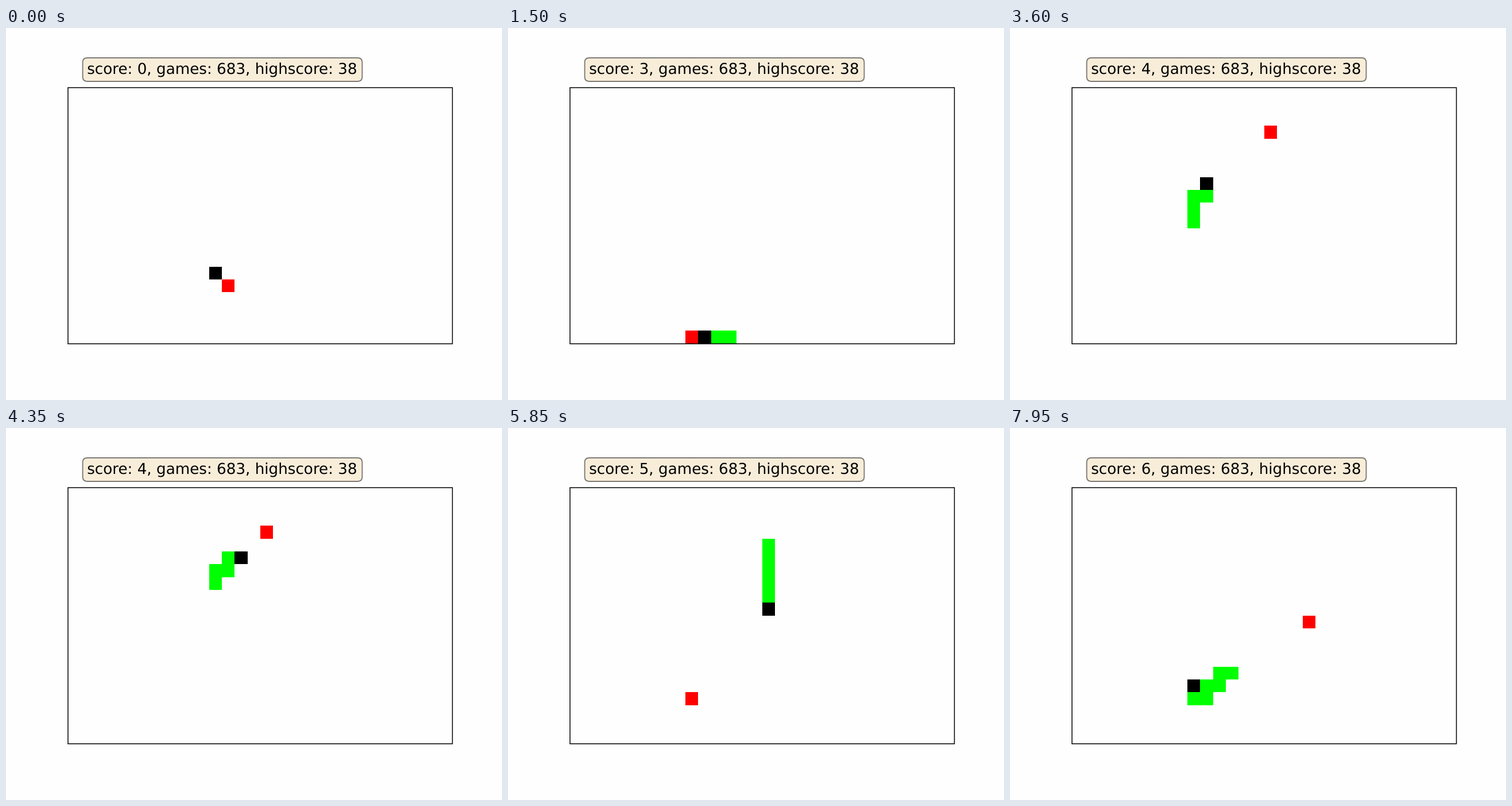
These frames come from a looping animation (864 by 648 pixels, 8000 ms). An HTML page with a canvas:

```html
<!DOCTYPE html>
<html lang="en">
<head>
<meta charset="utf-8">
<title>Snake</title>
<style>
  html, body { margin: 0; width: 100%; height: 100%; overflow: hidden; background: #fefefe; }
  canvas { display: block; }
</style>
</head>
<body>
<canvas id="stage" width="864" height="648"></canvas>
<script>
const ctx = document.getElementById('stage').getContext('2d');
const LOOP = 8000, STEP = 150;

// One letter per step: the direction in which the head moves.
const moves = 'DRDDDRDLLLL' + 'U'.repeat(11) + 'RU'.repeat(5) + 'R' +
  'D'.repeat(8) + 'LD'.repeat(5) + 'LU';
const dirs = { U: [0, -1], D: [0, 1], L: [-1, 0], R: [1, 0] };
const path = [[11, 14]];
for (const m of moves) {
  const [x, y] = path[path.length - 1];
  path.push([x + dirs[m][0], y + dirs[m][1]]);
}

// Food as [first step, column, row], and the steps that score.
const foods = [[0, 12, 15], [2, 13, 18], [6, 10, 19], [10, 9, 19],
  [11, 9, 13], [17, 15, 3], [33, 9, 16], [52, 18, 10]];
const meals = [2, 6, 10, 17, 33, 52];
const scoreAt = step => meals.filter(m => m <= step).length;

const edgeX = c => Math.round(108 + 22.33 * c);
const edgeY = r => Math.round(103.2 + 22.33 * r);

function cell([c, r], color) {
  const x = edgeX(c), y = edgeY(r);
  ctx.fillStyle = color;
  ctx.fillRect(x, y, edgeX(c + 1) - x, edgeY(r + 1) - y);
}

function label(score) {
  const l = 133.6, t = 52, r = 620.5, b = 93, k = 7.9;
  ctx.beginPath();
  ctx.moveTo(l + k, t);
  ctx.lineTo(r - k, t);
  ctx.quadraticCurveTo(r, t, r, t + k);
  ctx.lineTo(r, b - k);
  ctx.quadraticCurveTo(r, b, r - k, b);
  ctx.lineTo(l + k, b);
  ctx.quadraticCurveTo(l, b, l, b - k);
  ctx.lineTo(l, t + k);
  ctx.quadraticCurveTo(l, t, l + k, t);
  ctx.closePath();
  ctx.fillStyle = '#f8edd9';
  ctx.fill();
  ctx.strokeStyle = 'rgba(0, 0, 0, .5)';
  ctx.lineWidth = 1.875;
  ctx.stroke();

  ctx.font = '26.2px "DejaVu Sans", sans-serif';
  ctx.textRendering = 'geometricPrecision';
  ctx.fillStyle = '#000';
  ctx.fillText(`score: ${score}, games: 683, highscore: 38`, 141.2, 79.8);
}

function draw(step) {
  ctx.fillStyle = '#fefefe';
  ctx.fillRect(0, 0, 864, 648);

  cell(foods.filter(f => f[0] <= step).pop().slice(1), '#f00');
  // The body grows one step after a meal.
  const tail = step - scoreAt(step - 1);
  for (let i = tail; i < step; i++) cell(path[i], '#0f0');
  cell(path[step], '#000');

  ctx.strokeStyle = '#000';
  ctx.lineWidth = 1.5;
  ctx.strokeRect(108, 103.9, 669.6, 446.2);
  label(scoreAt(step));
}

const start = performance.now();
function tick() {
  draw(Math.floor((performance.now() - start) % LOOP / STEP));
  requestAnimationFrame(tick);
}
tick();
</script>
</body>
</html>
```
